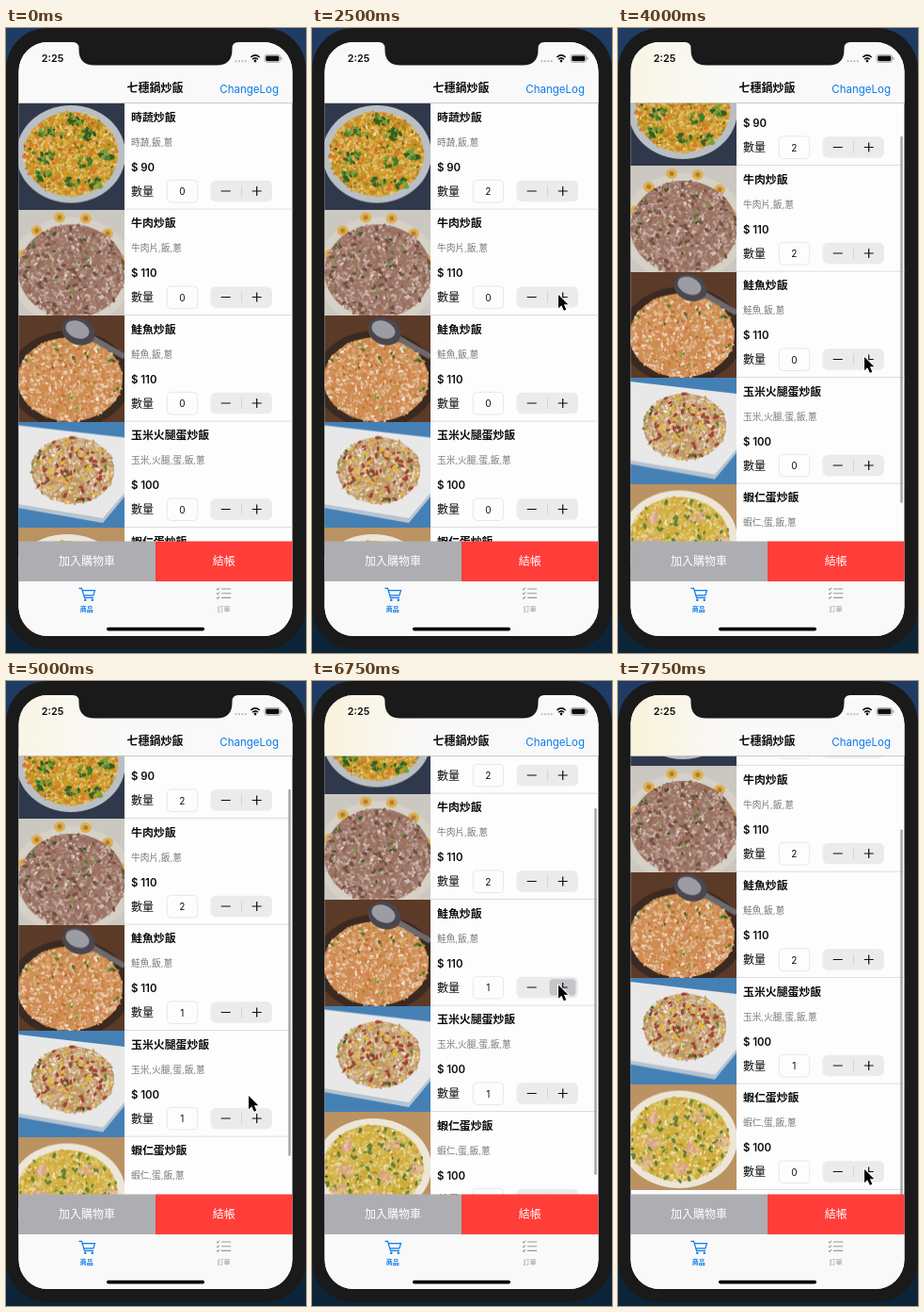
Recreate the animation shown at these times as an HTML page with a canvas. Size 319 by 663 pixels, loop 8000 ms.

```html
<!DOCTYPE html>
<html lang="zh-Hant">
<head>
<meta charset="utf-8">
<title>Menu</title>
<style>
html, body { margin: 0; width: 100%; height: 100%; overflow: hidden; background: #0b1830; }
canvas { display: block; width: 319px; height: 663px; }
</style>
</head>
<body>
<canvas id="stage"></canvas>
<script>
const W = 319, H = 663, LOOP = 8000, STEP = 250;
const ROW = 112.5, TOP = 80, PHOTO = 113;
const FONT = 'Inter, "Noto Sans CJK TC", "Noto Sans CJK JP", "Noto Sans CJK", sans-serif';
const BLUE = '#0a7aec', INK = '#0c0c0c', BEZEL = '#1a1a1b';
const GREENS = ['#477c2c', '#6fa23c', '#315f24'];

const dpr = Math.max(1, window.devicePixelRatio || 1);
const canvas = document.getElementById('stage');
canvas.width = W * dpr;
canvas.height = H * dpr;
const c = canvas.getContext('2d');

const tap = (t, row) => ({ t, row });
const point = (t, x, y) => ({ t, x, y });
const drag = (t, by) => ({ t, by });

// Everything below follows from these gestures
const TAPS = [tap(1250, 0), tap(1750, 0), tap(2750, 1), tap(3000, 1),
  tap(4250, 2), tap(4750, 3), tap(6750, 2), tap(8000, 4)];
const DRAGS = [drag(3250, 46.5), drag(5000, 26.5), drag(7000, 29.5)];
const REST = [point(500, 300, 330), point(3500, 260, 291), point(5000, 258, 440),
  point(5500, 247, 387), point(7250, 258, 300)];

const clamp = v => Math.max(0, Math.min(1, v));
const easeOut = p => 1 - (1 - p) ** 2.4;
const smooth = p => p * p * (3 - 2 * p);
const mix = (a, b, p) => a + (b - a) * p;

const scrollAt = t =>
  DRAGS.reduce((sum, d) => sum + d.by * easeOut(clamp((t - d.t) / 500)), 0);

// The pointer reaches a button one step before it taps
const stops = [...REST, ...TAPS.flatMap(({ t, row }) => [t - STEP, t].map(
  at => point(at, 262, TOP + row * ROW + 90.5 - scrollAt(at))))].sort((a, b) => a.t - b.t);

function pointerAt(t) {
  const i = stops.findLastIndex(s => s.t <= t);
  if (i < 0) return null;
  const a = stops[i], b = stops[i + 1] || a;
  const p = smooth(clamp((t - a.t) / (b.t - a.t || 1)));
  return [mix(a.x, b.x, p), mix(a.y, b.y, p)];
}

function random(seed) {
  return () => {
    seed = (seed * 1664525 + 1013904223) >>> 0;
    return seed / 4294967296;
  };
}

function oval(g, x, y, rx, ry, fill, turn = 0) {
  g.fillStyle = fill;
  g.beginPath();
  g.ellipse(x, y, rx, ry, turn, 0, 7);
  g.fill();
}

function scatter(g, rnd, n, [x, y, rx, ry], size, color) {
  for (let i = 0; i < n; i++) {
    const a = rnd() * 6.283, r = Math.sqrt(rnd()), k = size * (0.7 + rnd() * 0.6);
    oval(g, x + Math.cos(a) * r * rx, y + Math.sin(a) * r * ry, k, k * 0.55, color(), rnd() * 3.14);
  }
}

function clumps(g, rnd, n, [x, y, rx, ry], color) {
  for (let i = 0; i < n; i++) {
    const a = i * 2.4 + 0.6, r = 0.35 + 0.55 * Math.sqrt(i / n);
    scatter(g, rnd, 16, [x + Math.cos(a) * r * rx, y + Math.sin(a) * r * ry, 8, 6], 2.6, color);
  }
}

function sunflowers(g) {
  for (let i = 0; i < 6; i++) {
    const a = 3.4 + i * 0.54, x = 56 + Math.cos(a) * 52, y = 62 + Math.sin(a) * 55;
    oval(g, x, y, 6, 5.5, '#dcb04c');
    oval(g, x, y, 2.5, 2.5, '#b77b31');
  }
}

function spoon(g) {
  g.strokeStyle = '#6d6a6e';
  g.lineWidth = 6;
  g.stroke(new Path2D('M72 20L113 44'));
  oval(g, 64, 17, 18, 14, '#4a484e', 0.4);
  oval(g, 63, 15, 13, 9, '#9c9ca4', 0.4);
}

function tray(g) {
  g.fillStyle = '#b6c3d0';
  g.fill(new Path2D('M0 6L113 20V80L90 108L0 92Z'));
  g.fillStyle = '#e8e8e9';
  g.fill(new Path2D('M0 4L113 17V76L90 103L0 88Z'));
}

const DISHES = [
  { name: '時蔬炒飯', parts: '時蔬,飯,蔥', price: 90,
    cloth: '#30394b', plate: '#b9bfc4', bowl: [56, 54, 58, 52], rice: [41, 68, 56],
    bits: '#d97a2c', over: (g, rnd, area, pick) => clumps(g, rnd, 9, area, pick) },
  { name: '牛肉炒飯', parts: '牛肉片,飯,蔥', price: 110,
    cloth: '#cbc8c2', plate: '#d6d1c6', bowl: [57, 66, 66, 58], rice: [17, 22, 60],
    bits: '#71503f', under: sunflowers },
  { name: '鮭魚炒飯', parts: '鮭魚,飯,蔥', price: 110,
    cloth: '#5c3a28', plate: '#3b2a22', bowl: [55, 68, 65, 52], rice: [29, 56, 66],
    bits: '#d98352', over: spoon },
  { name: '玉米火腿蛋炒飯', parts: '玉米,火腿,蛋,飯,蔥', price: 100,
    cloth: '#4580b5', plate: '#d5d2cc', bowl: [58, 52, 51, 41], rice: [34, 42, 67],
    bits: '#a54236', under: tray,
    over: (g, rnd, area) => scatter(g, rnd, 35, area, 2.4, () => '#e5b637') },
  { name: '蝦仁蛋炒飯', parts: '蝦仁,蛋,飯,蔥', price: 100,
    cloth: '#bb9262', plate: '#ece6d8', bowl: [52, 59, 62, 52], rice: [46, 62, 63],
    bits: '#62813a', over: (g, rnd, area) => clumps(g, rnd, 7, area, () => rnd() < 0.5 ? '#d9a484' : '#e5bda0') }
];

function makePhoto(dish, i) {
  const pic = document.createElement('canvas');
  const k = Math.ceil(dpr), rnd = random(41 + i * 97);
  pic.width = pic.height = PHOTO * k;
  const g = pic.getContext('2d');
  g.scale(k, k);
  g.fillStyle = dish.cloth;
  g.fillRect(0, 0, PHOTO, PHOTO);
  const [x, y, rx, ry] = dish.bowl, area = [x, y, rx * 0.86, ry * 0.86];
  const [hue, sat, light] = dish.rice;
  if (dish.under !== tray) oval(g, x, y, rx, ry, dish.plate);
  if (dish.under) dish.under(g);
  oval(g, ...area, `hsl(${hue},${sat}%,${light - 10}%)`);
  scatter(g, rnd, 1000, area, 2, () =>
    `hsl(${hue + rnd() * 10 - 5},${sat}%,${light + (rnd() + rnd() - 1) * 27}%)`);
  scatter(g, rnd, 50, area, 2.6, () => dish.bits);
  const pick = () => GREENS[Math.floor(rnd() * GREENS.length)];
  scatter(g, rnd, 18, area, 2, pick);
  if (dish.over) dish.over(g, rnd, area, pick);
  return pic;
}
const photos = DISHES.map(makePhoto);

// y is the optical middle of the text
function text(s, x, y, size, weight, color, align = 'left') {
  c.font = `${weight} ${size}px ${FONT}`;
  c.fillStyle = color;
  c.textAlign = align;
  c.fillText(s, x, y + size * 0.37);
}

function rect(x, y, w, h, color) {
  c.fillStyle = color;
  c.fillRect(x, y, w, h);
}

function round(x, y, w, h, r, color) {
  c.fillStyle = color;
  c.beginPath();
  c.roundRect(x, y, w, h, r);
  c.fill();
}

function frame(x, y, w, h, r, color) {
  c.strokeStyle = color;
  c.lineWidth = 0.8;
  c.beginPath();
  c.roundRect(x, y, w, h, r);
  c.stroke();
}

function stroke(path, color, width) {
  c.strokeStyle = color;
  c.lineWidth = width;
  c.stroke(new Path2D(path));
}

function drawRow(dish, i, y, t) {
  const taps = TAPS.filter(p => p.row === i);
  const count = taps.filter(p => p.t + STEP <= t).length;
  const pressed = taps.some(p => p.t === t);

  c.drawImage(photos[i], 13, y, PHOTO, ROW);
  text(dish.name, 133, y + 14.5, 11.9, 700, INK);
  text(dish.parts, 133, y + 41, 9.7, 300, '#777');
  text('$ ' + dish.price, 133, y + 67.5, 11.4, 600, INK);
  text('數量', 133, y + 93.5, 12, 400, INK);
  frame(171.4, y + 81.4, 32.2, 23.6, 4, '#e2e2e2');
  text(count, 187.3, y + 93.5, 10, 400, INK, 'center');

  const mid = y + 93;
  round(217.5, mid - 11.2, 65.5, 22.4, 5.5, '#ebebec');
  if (pressed) round(252.5, mid - 8.8, 28, 17.6, 4, '#c5c5c9');
  else rect(250, mid - 6, 0.8, 12, '#cfcfd1');
  stroke(`M228.7 ${mid}h10 M261.7 ${mid}h10 M266.7 ${mid - 5}v10`, INK, 1.2);
  rect(126, y + ROW - 0.8, 179, 0.8, '#d5d5d7');
}

function drawStatus() {
  text('2:25', 49.5, 32.5, 10.8, 600, INK, 'center');
  for (let i = 0; i < 4; i++) oval(c, 244.5 + i * 3.4, 35.2, 1.1, 1.1, '#bdbdbd');
  stroke('M260.3 31Q265 26.8 269.7 31M262 33.2Q265 30.6 268 33.2', INK, 1.5);
  oval(c, 265, 35, 1.4, 1.4, INK);
  frame(275, 28.4, 16.6, 8, 2.3, '#999');
  round(276.2, 29.6, 14.2, 5.6, 1.4, INK);
  round(292.4, 31, 1.1, 2.8, 0.5, '#999');
}

function drawNav(scroll) {
  rect(13, 15, 292, 64.5, '#f9f9f9');
  const tint = c.createLinearGradient(13, 0, 125, 0);
  tint.addColorStop(0, `rgba(250,226,130,${0.26 * clamp(scroll / 72)})`);
  tint.addColorStop(1, 'rgba(250,230,140,0)');
  rect(13, 15, 112, 64.5, tint);
  rect(13, 79, 292, 0.8, '#bebebe');
  drawStatus();
  text('七穗鍋炒飯', 158.5, 64, 12, 700, INK, 'center');
  text('ChangeLog', 290, 64.3, 11.5, 400, BLUE, 'right');
}

function drawTabs() {
  rect(13, 544.5, 146, 42.5, '#aeaeb2');
  rect(159, 544.5, 146, 42.5, '#ff3d39');
  text('加入購物車', 86, 565.7, 12, 400, '#fff', 'center');
  text('結帳', 231.7, 565.7, 12, 400, '#fff', 'center');
  rect(13, 587, 292, 60, '#f9f9f9');
  stroke('M77.5 594.3h3l3 10h9.5M81.2 596.7h13.3l-1.6 5.2h-10', BLUE, 1.2);
  oval(c, 84.3, 606.8, 1.3, 1.3, BLUE);
  oval(c, 91.8, 606.8, 1.3, 1.3, BLUE);
  text('商品', 85.8, 616, 7, 700, BLUE, 'center');
  for (let y = 595; y < 606; y += 4.7)
    stroke(`M224 ${y}l1 1l2 -2.2M229 ${y}h10.2`, '#999', 1.1);
  text('訂單', 231.5, 616, 7, 500, '#949494', 'center');
  round(107, 635.7, 104, 3.7, 1.9, '#050505');
}

function drawPointer(x, y) {
  c.save();
  c.translate(x, y);
  const arrow = new Path2D('M0 0V14.2L3.3 11.2L5.8 16.8L8.3 15.7L5.9 10.2H10.3Z');
  c.lineJoin = 'round';
  c.strokeStyle = '#fff';
  c.lineWidth = 2;
  c.stroke(arrow);
  c.fillStyle = '#000';
  c.fill(arrow);
  c.restore();
}

function draw(t) {
  const scroll = scrollAt(t), pointer = pointerAt(t);
  c.setTransform(dpr, 0, 0, dpr, 0, 0);
  const desk = c.createLinearGradient(0, 0, 0, H);
  desk.addColorStop(0, '#1f3c64');
  desk.addColorStop(1, '#0c2438');
  rect(0, 0, W, H, desk);
  round(0, 0, W, 659, 44, BEZEL);

  c.save();
  c.beginPath();
  c.roundRect(13.5, 15, 291, 630, 31);
  c.clip();
  rect(13, 15, 292, 630, '#fdfdfd');
  DISHES.forEach((dish, i) => drawRow(dish, i, TOP + i * ROW - scroll, t));
  if (scroll) round(300.3, 79.5 + scroll * 0.76, 2.4, 389, 1.2, '#a3a3a5');
  drawNav(scroll);
  drawTabs();
  c.restore();

  c.fillStyle = BEZEL;
  c.fill(new Path2D('M71 14V15Q77.5 15 77.5 21.5V23Q77.5 39.5 94 39.5H224Q240.5 39.5 240.5 23V21.5Q240.5 15 247 15V14Z'));
  if (pointer) drawPointer(...pointer);
}

const start = performance.now();
function tick() {
  const t = (performance.now() - start) % LOOP;
  draw(Math.floor(t / STEP) * STEP);
  requestAnimationFrame(tick);
}
tick();
</script>
</body>
</html>
```
